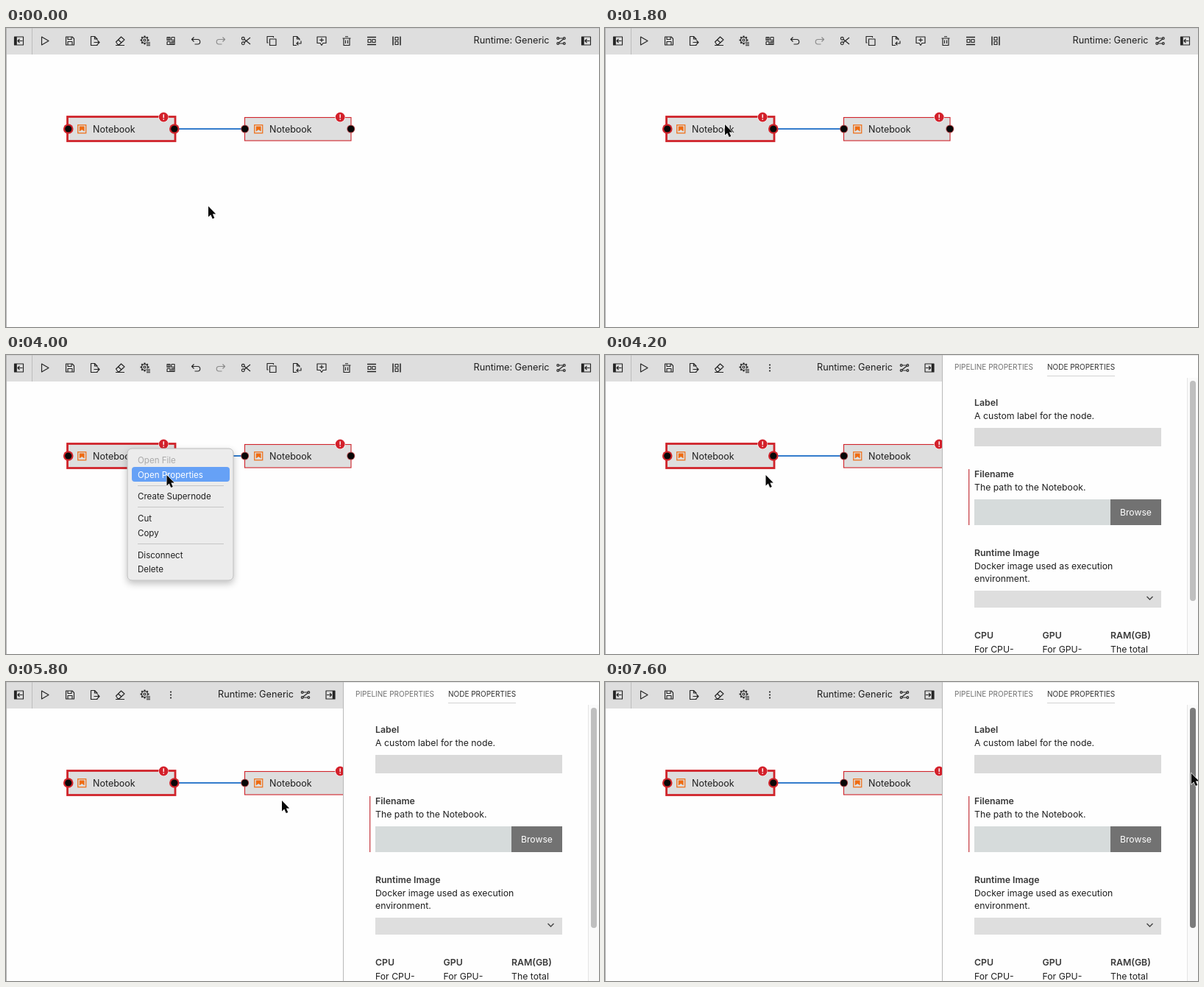
Recreate the animation shown at these times as an HTML page. Size 806x406 px, loop 8000 ms.

```html
<!DOCTYPE html>
<html lang="en">
<head>
<meta charset="utf-8">
<title>Pipeline editor</title>
<style>
  html, body { margin: 0; width: 100%; height: 100%; overflow: hidden; background: #fefefe; }
  svg { display: block; width: 806px; height: 406px; font-family: Inter, "Open Sans", sans-serif; }
  text { fill: #1e1e1e; white-space: pre; }
  .icon { fill: none; stroke: #242424; stroke-width: 1.15; stroke-linejoin: round; }
  .icon .solid { fill: #242424; stroke: none; }
</style>
</head>
<body>
<svg id="stage" viewBox="0 0 806 406"></svg>
<script>
const LOOP = 8000, STEP = 200;
const MENU_OPEN = 2000, HIGHLIGHT_ON = 3000, PANEL_OPEN = 4200, SCROLL_HOVER = 7400;

const rect = (x, y, w, h, fill, extra = "") =>
  `<rect x="${x}" y="${y}" width="${w}" height="${h}" fill="${fill}" ${extra}/>`;
const text = (x, y, size, label, extra = "") =>
  `<text x="${x}" y="${y}" font-size="${size}" ${extra}>${label}</text>`;
const path = (d, extra = "") => `<path d="${d}" ${extra}/>`;
const solid = d => path(d, 'class="solid"');
const dot = (x, y, r, extra = 'class="solid"') => `<circle cx="${x}" cy="${y}" r="${r}" ${extra}/>`;

// Icons are drawn around their own centre.
const sidePanel = path("M-6-5.5H6V5.5H-6ZM5 0H-1M1-2.5L-1.5 0L1 2.5") + solid("M-6-5.5H-2.7V5.5H-6Z");
const gearTeeth = Array.from({ length: 8 }, (_, i) =>
  `<path d="M0-4V-6" stroke-width="2" transform="rotate(${i * 45})"/>`).join("");
const icons = {
  sidePanel,
  sidePanelFlipped: `<g transform="scale(-1 1)">${sidePanel}</g>`,
  run: path("M-4.5-5.5L5 0L-4.5 5.5Z"),
  save: path("M-5.5-5.5H3L5.5-3V5.5H-5.5ZM-3-5.5V-2H2V-5.5M-3 5.5V1H3V5.5"),
  exportFile: path("M3.5-1V-2.5L0-6H-5V6H3.5V4.5M0-6V-2.5H3.5M-1 2H6.5M4-.5L6.5 2L4 4.5"),
  eraser: path("M-5.5 1.5L1.5-5.5L6-1.5L-1 5H-3ZM-2.5-1.5L2 2.5M-6 6H6"),
  settings: `<g transform="translate(-1 -1)">${gearTeeth}${dot(0, 0, 4, "")}${dot(0, 0, 1.5, "")}</g>` +
    rect(1, 1, 6, 6, "#dedede", 'stroke="none"') + path("M1.5 2.2H6.5M1.5 4.2H6.5M1.5 6.2H6.5"),
  components: path("M-5-5H-1V-1H-5ZM1-5H5V5H-5V1M-5 1H-1V5M1-5V-1H5M1 1H5M1 1V5M-3-5V-1M3 1V5"),
  undo: path("M-2.5-5L-5.5-2L-2.5 1M-5.5-2H2.5A3.2 3.2 0 0 1 2.5 4.5H-1.5"),
  redo: `<g opacity=".45">${path("M2.5-5L5.5-2L2.5 1M5.5-2H-2.5A3.2 3.2 0 0 0-2.5 4.5H1.5")}</g>`,
  cut: dot(-3.7, -3.3, 1.9, "") + dot(-3.7, 3.3, 1.9, "") + path("M-2.2-2.2L6 4.5M-2.2 2.2L6-4.5"),
  copy: path("M-2.5-2.5H6V6H-2.5ZM-4.5 2.5H-6V-6H2.5V-4.5"),
  paste: path("M4-1V-2.5L.5-6H-4.5V6H0M.5-6V-2.5H4M6 0V3.5H0M2.3 1.2L0 3.5L2.3 5.8"),
  comment: path("M-6-5.5H6V3H2L0 6L-2 3H-6ZM0-4V1.5M-2.8-1.2H2.8"),
  trash: path("M-5.5-3.5H5.5M-4-3.5V6H4V-3.5M-2-5.8H2M-1.5-1V3.5M1.5-1V3.5"),
  alignRows: path("M-6-5H6M-6 5H6", 'stroke-width="1.5"') + path("M-5-2H-1V2H-5ZM1-2H5V2H1Z"),
  alignColumns: path("M-5-6V6M5-6V6", 'stroke-width="1.5"') + path("M-2-5H2V-1H-2ZM-2 1H2V5H-2Z"),
  overflow: dot(0, -4, 1.1) + dot(0, 0, 1.1) + dot(0, 4, 1.1),
  runtime: dot(-4.3, -3.5, 1.4, "") + dot(4.3, -3.5, 1.4, "") + dot(-4.3, 3.5, 1.4, "") +
    dot(4.3, 3.5, 1.4, "") + path("M-2.8-3.5H2.8M3.3-2.5L-3.3 2.5M-2.8 3.5H2.8"),
};
const icon = (name, x) => `<g class="icon" transform="translate(${x} 17.5)">${icons[name]}</g>`;

const mainTools = ["sidePanel", "run", "save", "exportFile", "eraser", "settings"];
const extraTools = ["components", "undo", "redo", "cut", "copy", "paste", "comment", "trash",
  "alignRows", "alignColumns"];
const toolX = [17.5, 53, 87, 120.5, 155, 189.5, 224, 258, 292, 326, 361, 395, 429, 463, 497, 531];

function toolbar(width, tools, toggle) {
  return rect(0, 0, width, 36, "#dedede") + rect(0, 0, width, 1, "#cfcfcf") +
    rect(35, 0, 1, 36, "#bdbdbd") +
    tools.map((name, i) => icon(name, toolX[i])).join("") +
    text(width - 170.5, 21.3, 12.7, "Runtime: Generic") +
    icon("runtime", width - 51.5) + icon(toggle, width - 17.5);
}

function node(x, selected) {
  const red = "#d0242b";
  const box = selected
    ? rect(x - .5, 120.5, 146.5, 33, "#dedede", `stroke="${red}" stroke-width="2.8"`)
    : rect(x + .5, 121.5, 144.5, 31.5, "#dedede", `stroke="${red}" stroke-width="1.1"`);
  const ring = selected ? 6.8 : 5.5;
  const port = cx => dot(cx, 137, ring, `fill="${selected ? red : "#b5484c"}"`) +
    dot(cx, 137, 4.6, 'fill="#080808"');
  return box + port(x + .7) + port(x + 144.8) +
    rect(x + 13.7, 131.7, 11, 11, "none", 'stroke="#ee7420" stroke-width="1.3"') +
    path(`M${x + 15.8} 133.5h6.8v7l-3.4-2.4l-3.4 2.4Z`, 'fill="#ee6c12"') +
    text(x + 34, 142, 12.5, "Notebook") +
    dot(x + 130.2, 121, 7, 'fill="#fefefe"') + dot(x + 130.2, 121, 6.4, 'fill="#d3212b"') +
    path(`M${x + 130.2} 117.3v4.6m0 1.4v1.4`, 'stroke="#fff" stroke-width="1.4"');
}

function menu() {
  const items = [["Open File", 147], ["Open Properties", 167], ["Create Supernode", 196],
    ["Cut", 226], ["Copy", 246], ["Disconnect", 276], ["Delete", 295]];
  return `<g filter="url(#shadow)">` +
    rect(165, 127, 144, 179, "#ececec", 'rx="6" stroke="#bababa" stroke-width="1"') + "</g>" +
    rect(171, 152, 133, 20, "#66a1f6", 'rx="4" id="highlight"') +
    [177, 206, 256].map(y => rect(179, y, 117, 1, "#c6c6c6")).join("") +
    items.map(([label, y], i) => text(179, y, 11.55, label,
      i === 0 ? 'style="fill:#a9a9a9"' : i === 1 ? 'id="properties"' : "")).join("");
}

function panel() {
  const heading = (x, y, label) => text(x, y, 12.3, label, 'font-weight="600" style="fill:#383838"');
  const body = (x, y, label) => text(x, y, 12.25, label);
  return rect(458, 0, 348, 406, "#fefefe") + rect(458, 0, 1, 406, "#b9b9b9") +
    rect(459, 0, 347, 1, "#e4e4e4") +
    text(475, 20.2, 10, "PIPELINE PROPERTIES", 'style="fill:#707070"') +
    text(601, 20.2, 10, "NODE PROPERTIES", 'style="fill:#303030"') +
    rect(601, 28, 92, 1, "#d2d2d2") +
    heading(502, 69, "Label") + body(502, 87, "A custom label for the node.") +
    rect(502, 99, 254, 25, "#dadada") +
    rect(494, 155, 1.3, 76, "#c9474d") +
    heading(502, 166, "Filename") + body(502, 184, "The path to the Notebook.") +
    rect(502, 196, 185, 35, "#d6dbdb") + rect(687, 196, 69, 35, "#727272") +
    text(700, 218, 12.2, "Browse", 'style="fill:#fff"') +
    heading(502, 273, "Runtime Image") +
    body(502, 291, "Docker image used as execution") + body(502, 308, "environment.") +
    rect(502, 320, 254, 23, "#dedede") +
    path("M736.5 328L740.5 332L744.5 328", 'fill="none" stroke="#444" stroke-width="1.4"') +
    [[502, "CPU", "For CPU-"], [594.5, "GPU", "For GPU-"], [687, "RAM(GB)", "The total"]]
      .map(([x, title, note]) => heading(x, 385, title) + body(x, 404, note)).join("") +
    rect(791, 31, 15, 375, "#fafafa") + rect(791, 31, 1, 375, "#e5e5e5") +
    rect(795, 35, 8, 299, "#bfbfbf", 'rx="4" id="thumb"');
}

const byId = id => document.getElementById(id);
byId("stage").innerHTML = `
  <defs><filter id="shadow" x="-20%" y="-20%" width="140%" height="145%">
    <feDropShadow dx="0" dy="4" stdDeviation="5" flood-opacity=".24"/></filter></defs>
  ${rect(0, 0, 806, 406, "#fefefe")}
  <g id="wideBar">${toolbar(806, [...mainTools, ...extraTools], "sidePanel")}</g>
  ${path("M234 137H321", 'stroke="#347ccc" stroke-width="2"')}
  ${node(84, true)}${node(324, false)}
  <g id="menu">${menu()}</g>
  <g id="panel">${toolbar(458.5, [...mainTools, "overflow"], "sidePanelFlipped")}${panel()}</g>
  ${rect(0, 0, 1, 406, "#b4b4b4")}
  ${path("M0 0V14.6L3.3 11.5L5.7 17L8.3 15.9L5.9 10.6H10.2Z",
    'id="cursor" fill="#080808" stroke="#fff" stroke-width="1.2" paint-order="stroke"')}`;

// Pointer stops: time, x, y
const stops = [[0, 275, 242], [200, 275, 242], [1400, 163, 131], [2000, 163, 131],
  [2600, 191, 146], [3400, 218.5, 163], [4400, 218.5, 163], [5600, 375, 161],
  [5800, 375, 161], [7400, 797, 124], [LOOP, 797, 124]];

function pointerAt(t) {
  const i = stops.findIndex(stop => stop[0] > t);
  const [t0, x0, y0] = stops[i - 1], [t1, x1, y1] = stops[i];
  const u = (t - t0) / (t1 - t0), eased = u * u * (3 - 2 * u);
  return [x0 + (x1 - x0) * eased, y0 + (y1 - y0) * eased];
}

const show = (id, visible) => byId(id).setAttribute("display", visible ? "inline" : "none");

function render(now) {
  const t = Math.floor((now % LOOP) / STEP) * STEP;
  const panelOpen = t >= PANEL_OPEN, highlighted = t >= HIGHLIGHT_ON;
  show("wideBar", !panelOpen);
  show("panel", panelOpen);
  show("menu", t >= MENU_OPEN && !panelOpen);
  show("highlight", highlighted);
  byId("properties").style.fill = highlighted ? "#fff" : "#1e1e1e";
  byId("thumb").setAttribute("fill", t >= SCROLL_HOVER ? "#7c7c7c" : "#bfbfbf");
  byId("cursor").setAttribute("transform", `translate(${pointerAt(t)})`);
}

const start = performance.now();
function tick() {
  render(performance.now() - start);
  requestAnimationFrame(tick);
}
tick();
</script>
</body>
</html>
```
